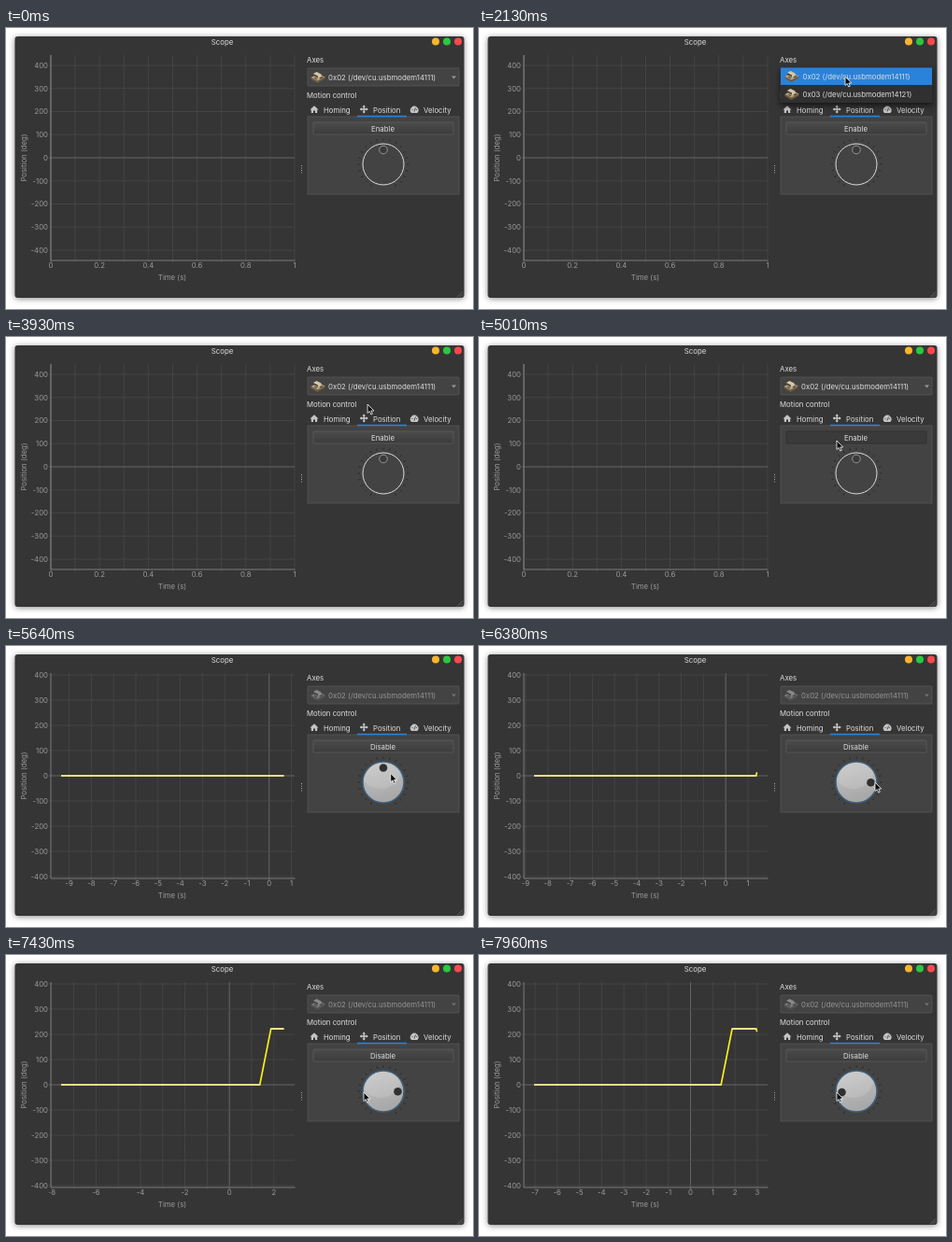
These frames come from a looping animation (500 px wide and 301 px high, 8000 ms). An HTML page:

```html
<!DOCTYPE html>
<html lang="en">
<head>
<meta charset="utf-8">
<title>Scope</title>
<style>
  html, body { margin: 0; height: 100%; overflow: hidden; background: #fff; }
  svg { display: block; width: 500px; height: 301px; font: 7.8px Inter, "Open Sans", sans-serif; fill: #ddd; }
  .window { fill: #353535; filter: drop-shadow(0 1px 3px #0007); }
  .mid { text-anchor: middle; }
  .end { text-anchor: end; }
  .dim { fill: #9a9a9a; }
  .box { fill: #434343; stroke: #565656; stroke-width: .8; }
  .popup { fill: #303030; filter: drop-shadow(0 3px 3px #0009); }
  .line { fill: none; stroke: #ddd; }
  .grid { stroke: #484848; stroke-width: .8; }
  .zero { stroke: #6c6c6c; stroke-width: .9; }
  .frame { fill: none; stroke: #858585; stroke-width: .9; }
  #combo.off { filter: grayscale(1); opacity: .52; }
</style>
</head>
<body>
<svg viewBox="0 0 500 301">
  <defs>
    <linearGradient id="raised" x2="0" y2="1"><stop stop-color="#4b4b4b"/><stop offset="1" stop-color="#3c3c3c"/></linearGradient>
    <linearGradient id="shine" x2=".3" y2="1"><stop stop-color="#c6c6c6"/><stop offset="1" stop-color="#a8a8a8"/></linearGradient>
    <clipPath id="labels"><path d="M46 245h264v20H46z"/></clipPath>
    <g id="board">
      <path d="M0 7 7 10.500 15 6.500V8.500L7 13 0 9z" fill="#6d5b41"/>
      <path d="M0 7 8 3 15 6.500 7 10.500z" fill="#bba782"/>
      <path d="M2.500 3 6 1 11 3.500V6L7.500 7.500 2.500 5z" fill="#d5c7a8"/>
      <path d="M2.500 3 7.500 5.500V7.500L2.500 5zM9 7.500 12 6 13.500 6.800 10 8.500zM3 7.500 4.500 7 7 8.300 6 9z" fill="#4a4033"/>
    </g>
  </defs>

  <rect class="window" x="9.500" y="9" width="481" height="280" rx="3"/>
  <text class="mid" x="231.500" y="18">Scope</text>
  <circle cx="460" cy="14.500" r="4" fill="#f8b52d"/>
  <circle cx="472" cy="14.500" r="4" fill="#2bc840"/>
  <circle cx="484" cy="14.500" r="4" fill="#fb484f"/>
  <path d="M483 288.500 489 282.500M486 288.500 489 285.500" stroke="#777" stroke-width=".7"/>
  <path d="M316.500 147v10" stroke="#aaa" stroke-dasharray="1 1.500"/>

  <g id="plot"></g>
  <path class="frame" d="M48 29V249H309.500"/>
  <text class="mid dim" x="178" y="270">Time (s)</text>
  <text class="mid dim" transform="translate(22 139) rotate(-90)">Position (deg)</text>

  <text x="322" y="37">Axes</text>
  <rect class="box" x="323" y="43" width="162" height="19" rx="1"/>
  <g id="combo">
    <use href="#board" x="326.500" y="46"/>
    <text x="345" y="55.500">0x02 (/dev/cu.usbmodem14111)</text>
    <path d="M477 51.500h5l-2.500 3z" fill="#999"/>
  </g>

  <text x="322" y="75">Motion control</text>
  <rect class="box" x="323" y="95" width="162" height="83"/>
  <path d="M376 94.500h53" stroke="#2a82da" stroke-width="1.500"/>
  <path d="M325.500 87.500 330 83.200 334.500 87.500H333.200V91H331V88.500H329V91H326.800V87.500z" fill="#c4c4c4"/>
  <path d="M379.500 87h7.500M383.250 83.300v7.500" stroke="#ccc" stroke-width="1.300"/>
  <path d="M378.800 87l2-1.800v3.600zM387.700 87l-2-1.800v3.600zM383.250 82.500l1.800 2h-3.600zM383.250 91.500l1.800-2h-3.600z" fill="#ccc"/>
  <path d="M434 91a4.300 4.300 0 1 1 6.400 0z" fill="#c4c4c4"/>
  <path d="M437 89.500 438.500 85.500M434.500 87.500h1M439 87.500h1" stroke="#444" stroke-width=".9"/>
  <text x="340" y="90.500">Homing</text>
  <text x="393" y="90.500">Position</text>
  <text x="447" y="90.500">Velocity</text>

  <rect id="button" x="329" y="101" width="150" height="13" rx="1" stroke-width=".8"/>
  <text id="action" class="mid" x="403.500" y="110.500"></text>

  <g id="notches" stroke="#252525" stroke-width=".8"></g>
  <circle id="dial" cx="404" cy="146" r="22"/>
  <path id="gloss" d="M382.500 143A22 22 0 0 1 423 135Q417 153 400 153 388 152 382.500 143z" fill="#fff" opacity=".13"/>
  <circle id="knob" r="4.300"/>

  <g id="popup">
    <rect class="popup" x="322.500" y="42" width="163" height="38"/>
    <rect id="choice" x="323" width="162" height="18.500" fill="#2a82da"/>
    <use href="#board" x="327.500" y="45"/>
    <use href="#board" x="327.500" y="64"/>
    <text x="346.500" y="54.500">0x02 (/dev/cu.usbmodem14111)</text>
    <text x="346.500" y="73.500">0x03 (/dev/cu.usbmodem14121)</text>
  </g>

  <path id="cursor" d="M0 0V9.500L2.200 7.500 3.700 11 5.300 10.300 3.800 7H6.800z" fill="#080808" stroke="#fff" stroke-width=".8"/>
</svg>
<script>
const LOOP = 8000, ENABLED = 5060, ORIGIN = 4980;
const $ = id => document.getElementById(id);
const clamp = v => Math.min(1, Math.max(0, v));
const show = (id, on) => { $(id).style.display = on ? "" : "none"; };
const set = (id, attrs) => { for (const k in attrs) $(id).setAttribute(k, attrs[k]); };

// Cursor stops: time, x, y
const stops = [
  [1500, 428, -12], [1960, 392, 52], [2550, 392, 52], [2880, 391, 69],
  [3210, 389, 54], [3680, 389, 54], [4350, 383, 111], [5150, 383, 111],
  [5950, 426, 149], [6250, 424, 146], [6670, 424, 146], [7400, 383, 147], [LOOP, 383, 147]
];

function cursorAt(t) {
  const i = Math.max(1, stops.findIndex(s => s[0] > t));
  const [a, b] = [stops[i - 1], stops[i]];
  const u = clamp((t - a[0]) / (b[0] - a[0])), e = u * u * (3 - 2 * u);
  return [a[1] + (b[1] - a[1]) * e, a[2] + (b[2] - a[2]) * e];
}

// Measured position in degrees at s seconds on the time axis
const position = s => 222 * clamp((s - 1.37) / 0.5) - 444 * Math.max(0, s - 2.955);

function drawPlot(t, on) {
  const now = (t - ORIGIN) / 1000;
  const unit = on ? 23.8 : 261, x0 = on ? 297.5 - unit * now : 48;
  const step = on ? 1 : 0.1, every = on && (t < 7380 || t > 7680) ? 1 : 2;
  const scale = on ? 0.27 : 0.2475;
  const X = s => x0 + unit * s, Y = v => 139 - scale * v;
  let lines = "", labels = "", rows = "", curve = "";

  for (let i = Math.ceil((48 - x0) / unit / step); X(i * step) <= 309.5; i++) {
    const x = X(i * step);
    lines += `<path class="${i ? "grid" : "zero"}" d="M${x} 29V251"/>`;
    if (i % every === 0) labels += `<text class="mid dim" x="${x}" y="257">${+(i * step).toFixed(1)}</text>`;
  }
  for (let v = -400; v <= 400; v += 100) {
    lines += `<path class="${v ? "grid" : "zero"}" d="M46 ${Y(v)}H309"/>`;
    rows += `<text class="end dim" x="45" y="${Y(v) + 2.9}">${v}</text>`;
  }
  if (on) {
    const start = now - 10.02;
    const times = [start, 1.37, 1.87, 2.955].filter(s => s < now).concat(now);
    const points = times.map(s => X(s) + "," + Y(position(s))).join(" ");
    const flat = (a, b) => now > a ? `M${X(a)} ${Y(position(a))}H${X(Math.min(b, now))}` : "";
    curve = `<polyline points="${points}" fill="none" stroke="#fbf01c" stroke-width="1.7"/>
      <path d="${flat(start, 1.37)}${flat(1.87, 2.955)}" stroke="#fff2ee" stroke-width="1.1"/>`;
  }
  $("plot").innerHTML = `${lines}<g clip-path="url(#labels)">${labels}</g>${rows}${curve}`;
}

function drawControls(t, on) {
  const [x, y] = cursorAt(t);
  set("cursor", { transform: `translate(${x} ${y})` });
  show("cursor", t >= 1500);

  show("popup", t >= 1990 && t < 3690);
  set("choice", { y: y > 61 ? 61 : 42.5 });
  $("combo").classList.toggle("off", on);

  const pressed = t >= 4470 && !on;
  set("button", { fill: pressed ? "#3a3a3a" : "url(#raised)", stroke: pressed ? "#2e2e2e" : "#5c5c5c" });
  $("action").textContent = on ? "Disable" : "Enable";

  const angle = (t < 6330 ? 0 : t < 7900 ? 91 : -94) * Math.PI / 180;
  set("dial", { fill: on ? "url(#shine)" : "none", stroke: on ? "#3d617f" : "#ddd", "stroke-width": on ? 1.5 : 1 });
  set("knob", {
    cx: 404 + 15.5 * Math.sin(angle), cy: 146 - 15.5 * Math.cos(angle),
    fill: on ? "#303030" : "#3a3a3a", stroke: on ? "#303030" : "#aaa", "stroke-width": on ? 0 : 0.8
  });
  show("gloss", on);
}

for (let a = -150; a <= 150; a += 15)
  $("notches").innerHTML += `<path d="M404 121V118.500" transform="rotate(${a} 404 146)"/>`;

function frame() {
  const t = performance.now() % LOOP, on = t >= ENABLED;
  drawPlot(t, on);
  drawControls(t, on);
  requestAnimationFrame(frame);
}
frame();
</script>
</body>
</html>
```
